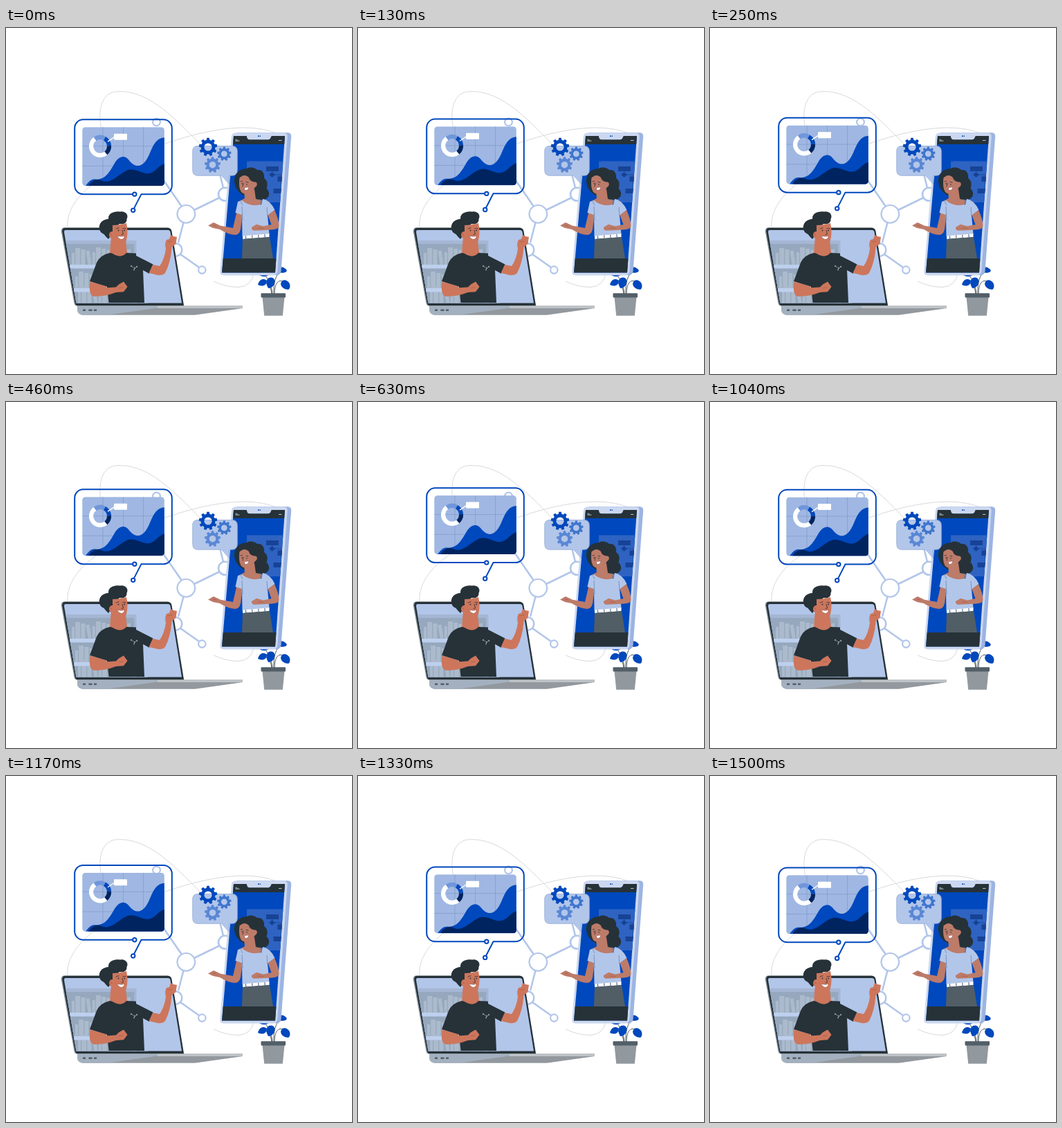
Recreate the animation shown at these times as an HTML page. Size 500 px wide and 500 px high, loop 1540 ms.

```html
<!DOCTYPE html>
<html lang="en">
<head>
<meta charset="utf-8">
<title>Online collaboration</title>
<style>
html, body { margin: 0; width: 100%; height: 100%; overflow: hidden; background: #fff; }
svg { display: block; width: 100vw; height: 100vh; }
.ink { fill: #263238; }
.blue { fill: #0048bd; }
.navy { fill: #00245f; }
.pale { fill: #b2c6ea; }
.skin { fill: #cd765c; }
.tan { fill: #bd7b69; }
.white { fill: #fff; }
.orbit { fill: none; stroke: #d2d4d7; stroke-width: .9; }
.net { fill: #fff; stroke: #b2c6ea; stroke-width: 2.6; }
.frame { fill: none; stroke: #0048bd; stroke-width: 2; }
.grid { fill: none; stroke: #849ecd; stroke-width: .8; }
.thin { fill: none; stroke: #263238; stroke-width: .8; stroke-linecap: round; }
.fold { fill: none; stroke: #a65a45; stroke-width: .7; stroke-linecap: round; }
</style>
</head>
<body>
<svg viewBox="0 0 500 500">
  <defs>
    <clipPath id="card"><rect x="110.300" y="143" width="118.500" height="85" rx="4.500"/></clipPath>
    <clipPath id="screen"><path d="M329 156H403L389 353.500H312Z"/></clipPath>
    <clipPath id="laptop"><path d="M86 292H234Q237 292 237.500 295L254 397.500H101.500L84 295Q84 292 86 292Z"/></clipPath>
  </defs>

  <g class="orbit">
    <path d="M89 288C87 264 104 241 129 223C160 199 196 179 229 167.500C276 151 344 134 389 151.500"/>
    <path d="M139 150C132 124 136 95 158 92C202 88 238 124 281 168"/>
    <path d="M300 366Q318 374.500 336 374.500Q355 373 358 355"/>
  </g>

  <g class="net">
    <path d="M205 187L254 258M272 263L309 245M309 211L314 231M256.500 281L249 310M252 327L279 346"/>
    <circle cx="260.300" cy="268.800" r="12.800" stroke-width="2.200"/>
    <circle cx="316.500" cy="240.300" r="9.500"/>
    <circle cx="245" cy="320.500" r="9.300"/>
    <circle cx="283.300" cy="349.600" r="5.200" stroke-width="2.200"/>
    <circle cx="217.500" cy="136" r="5.400" stroke-width="2.200"/>
  </g>

  <g id="panel">
    <path class="frame" d="M183 240H111.500A12.300 12.300 0 0 1 99.200 227.700V144.500A12.300 12.300 0 0 1 111.500 132.200H227.500A12.300 12.300 0 0 1 239.800 144.500V227.700A12.300 12.300 0 0 1 227.500 240H195.500L185 260.500"/>
    <g class="frame white"><circle cx="185.800" cy="240" r="2.700"/><circle cx="183.700" cy="263.200" r="2.700"/></g>
    <g clip-path="url(#card)">
      <rect x="110" y="143" width="119" height="85" fill="#9fb7e2"/>
      <path class="grid" d="M140 143V228M169.500 143V228M198.500 143V228M110 170.500H229M110 199.300H229"/>
      <path class="blue" d="M115 228C121 220 124 218 130 218.500C144 219 150 207 157 195C162 187 170 182 177 190C184 199 191 202 199 195C210 186 210 159 229 158V228Z"/>
      <path class="navy" d="M119 228C125 219 132 217 139 220.500C151 226 163 211 173 206.500C186 200 194 211 206 210C216 209 219 199 229 196V228Z"/>
    </g>
    <g id="donut" fill="none" stroke-width="6.200"></g>
    <path d="M147 164L156.500 157.500" stroke="#fff" stroke-width="1.300"/>
    <rect class="white" x="156" y="152.500" width="19" height="9" rx=".8"/>
  </g>

  <g id="plant">
    <path class="thin" d="M385 385C384 371 378 361 371 353M387 385C386 368 390 357 397 350M388 385C388 368 394 361 404 368M384 385C383 374 379 367 371 368"/>
    <g class="blue">
      <path d="M366 357C367 346 375 346 382 350C382 358 374 362 366 357Z"/>
      <path d="M391 353C393 345 399 343 405 349C408 353 401 355 391 353Z"/>
      <path d="M364 371C366 363 372 361 377 365C376 373 371 374 364 371Z"/>
      <path d="M377 372C374 363 381 358 387 362C391 368 386 376 379 376Z"/>
      <path d="M397 369C399 361 408 364 410 370C411 374 410 377 408 378C403 378 397 375 397 369Z"/>
    </g>
    <path d="M370.500 389H402.500L399.800 415.800H373.200Z" fill="#91989e"/>
    <rect x="368.500" y="383.300" width="35.500" height="6.300" rx="1" fill="#525f68"/>
  </g>

  <path d="M333 151.200H407.500Q412.500 151.500 412.200 157L397.500 351.500Q396.500 357.300 391 357.300H314Z" fill="#9cb4e2"/>
  <path d="M331 151.500H402Q407 152 406.700 157L392.300 351.500Q391.500 357.300 386 357.300H314Q308.800 357.300 309.300 352L325.800 157Q326.500 151.800 331 151.500Z" fill="#cbd8f0"/>
  <g clip-path="url(#screen)">
    <rect class="blue" x="309" y="156" width="96" height="198"/>
    <rect x="348" y="192.500" width="60" height="59.500" fill="#2e63c2"/>
    <g fill="#174395">
      <path d="M376 200H394V207H376ZM392.500 214.500H402V222H392.500ZM386.500 232H399V239H386.500ZM384.500 208L389 212L384.500 216L380 212Z"/>
      <path d="M384.500 206V212H398V236" fill="none" stroke="#174395" stroke-width=".8"/>
    </g>
    <rect class="ink" x="309" y="156" width="96" height="12"/>
    <rect class="ink" x="309" y="333" width="96" height="22"/>
  </g>
  <path d="M347.500 155.500H384L382 159.500Q381 161.300 379 161.300H351.500Q349.500 161.300 348.800 159.500Z" fill="#cbd8f0"/>
  <path d="M364 156.300H366M366.800 156.300H368" stroke="#0048bd" stroke-width="1.500"/>
  <path d="M332.500 164V160.500M334.500 164V161.500M336.500 164V162.500M394 162.500H398.500" stroke="#b7c0c8" stroke-width="1.200"/>

  <path d="M277 170.500H326.500Q334.300 170.500 334.300 178V205.500Q334.300 213.300 326.500 213.300H322.500V225.500L311.500 213.300H277Q269.700 213.300 269.700 205.500V178Q269.700 170.500 277 170.500Z" fill="#b2c6ea" stroke="#92abd9" stroke-width=".8"/>
  <g id="gears" fill-rule="evenodd"></g>

  <g id="woman">
    <path class="ink" d="M330 223C329 211 338 203 347 203.500C353 199.500 360 202 363 205C371 204 374 211 373 217C379 221 378 228 376.500 232C383 238 380 247 373 247.500C364 251 355 249 350 244C336 240 331 231 330 223Z"/>
    <path class="tan" d="M334.500 261L342 268L339 291Q337 299 331 299Q320 298 309 291L299 289L292 285.500L300 281L310 285.800L328 289Z"/>
    <path class="tan" d="M344 236L359 233L361 247L370 249L365 262L340 260L338 250L345 246Z"/>
    <path class="tan" d="M337.500 216C336 228 337.500 238 344 239.500C351 240 357 236 360 230C364 228 364 222 359 222.500C355 222 352 220 351 216C347 212 342 212 337.500 216Z"/>
    <path class="ink" d="M333 220C338 215 346 210 352 212C353 219 357 222 361 221L360 212L349 206L337 210Z"/>
    <path class="thin" d="M339 222L341.500 221.300M347 222.500L350 223M343 224L342 229"/>
    <circle class="ink" cx="341" cy="225" r=".8"/><circle class="ink" cx="348" cy="226" r=".8"/>
    <path d="M344.500 230.500L351 230C350 234 347 235.500 345 234Z" fill="#fff" stroke="#8d3f3b" stroke-width=".5"/>
    <path class="pale" d="M335 251L341 249Q352 259 369 255L371 247Q382 249 388.500 263L378 271L380.500 298L341.500 301L341 270L331.500 267Z"/>
    <path d="M338 248L342 256M367 247L369 256M341 258L342 278M377 259L378 272" fill="none" stroke="#637ba4" stroke-width=".7"/>
    <path d="M342 300.500L380.500 297.300V302.300L342 305Z" fill="#fff"/>
    <path d="M342 303L380 300" stroke="#657080" stroke-width="4.800" stroke-dasharray="1.200 8" stroke-dashoffset="-4"/>
    <path d="M342 305L381 302L386 333H341Z" fill="#515e66"/>
    <path class="tan" d="M378.500 270.500L388 263Q395 279 394.500 287Q393 291.500 381 291.700L360 292.800Q354 292.500 355 288L362 283.800L372 286.500L383.500 284Z"/>
    <path class="fold" d="M364 289L372 289.500M299 285L304 286"/>
  </g>

  <path d="M83 288.500H233.500Q238.500 289 239.300 294L257 401.500H102Q99 401 98.300 397L79.800 294Q79.800 289 83 288.500Z" fill="#88939f"/>
  <path class="ink" d="M85 288.800H234Q238.700 289 239.500 294L257 401.500H103.500Q100.500 401 99.700 397L81.200 294Q81 289.500 85 288.800Z"/>
  <g clip-path="url(#laptop)">
    <rect class="pale" x="80" y="290" width="180" height="110"/>
    <path d="M86 307H188.500V398H100Z" fill="#a5b6d4"/>
    <path d="M86 312H185V398H100Z" fill="#96a8bd"/>
    <g id="books" fill="#abbbcd"></g>
    <path d="M90 342H188.500V347.500H91ZM95 376H188.500V381.500H96Z" fill="#bdd0ee"/>
    <path class="pale" d="M184 325H205V398H184Z"/>
  </g>

  <path d="M103 401.500H342V405L273 414.800H111Q103 414 103 406Z" fill="#92989e"/>
  <path d="M103 401.500H219V404.500L146 414.800H111Q103 414 103 406Z" fill="#a3b0bf"/>
  <path d="M219 401.500H342V405H219Z" fill="#bcc2c6"/>
  <path d="M111 407.700H115M119.500 407.700H124.500M127 407.700H131" stroke="#515d69" stroke-width="2.600"/>

  <g id="man">
    <path class="skin" d="M152 301L173 307L175 326L169 333L159 331L150 326Z"/>
    <path class="ink" d="M150 325Q136 328 131 339L121 366L146 374L148.500 397H200L198 350L207 355L212.500 341.500L188 329V325.500L174 325Q166 334 153 325.500Z"/>
    <path class="ink" d="M148 305C143 301 144 299 138 296C132 290 134 277 148 276C147 267 158 264 165 265.500C172 264 178 270 174.500 276C175 283 168 284 164 283L157 290L151 301Z"/>
    <path class="skin" d="M154 285C160 285 168 284 174 282C176 290 176 299 174 307C170 316 157 313 153.500 304C147 304 148 293 154 294Z"/>
    <path class="thin" d="M159 290L163 288.700M169 289.500L173 289.800M168 292L169.500 298L167 298.500"/>
    <circle class="ink" cx="162.500" cy="292.500" r=".9"/><circle class="ink" cx="171" cy="292.500" r=".9"/>
    <path d="M160.500 300.500Q167 302 171.500 300.500Q170 306 166 305.500Q162 304 160.500 300.500Z" fill="#fff" stroke="#8b3e32" stroke-width=".5"/>
    <path class="skin" d="M121.500 366.500L146 373.500L144 375.500L159 374.500L163 370.500L170 366.500L175.500 374L170 381.300L159 382Q142 388.500 126 387.800Q119 385 121.500 366.500Z"/>
    <path class="skin" d="M212 342L222 344Q229 334 231 319Q229 311 232 306L236 305L238 299L242 301L247 302L245.500 312L239.500 317Q238 339 230 354Q226 358 219 357L206.500 354Z"/>
    <path class="fold" d="M163 376L169 375M234 309L240 308M151 297L153 300"/>
    <g fill="#88929a"><path d="M181 344L186 347L189 345M186 347L185 350" fill="none" stroke="#88929a" stroke-width=".8"/><circle cx="181" cy="344" r="1.200"/><circle cx="186" cy="347" r="1.200"/><circle cx="189" cy="345" r="1.200"/><circle cx="185" cy="349.500" r="1"/></g>
  </g>
</svg>
<script>
const $ = id => document.getElementById(id);
const polar = (x, y, r, a) => `${(x + r * Math.cos(a)).toFixed(2)} ${(y + r * Math.sin(a)).toFixed(2)}`;

function add(parent, tag, attrs) {
  const el = document.createElementNS("http://www.w3.org/2000/svg", tag);
  for (const key in attrs) el.setAttribute(key, attrs[key]);
  parent.appendChild(el);
}

function arc(from, to, stroke) {
  const rad = deg => (deg - 90) * Math.PI / 180;
  const big = to - from > 180 ? 1 : 0;
  add($("donut"), "path", {
    stroke,
    d: `M${polar(136, 170.8, 13, rad(from))}A13 13 0 ${big} 1 ${polar(136, 170.8, 13, rad(to))}`
  });
}

function gear(x, y, r, hole, fill) {
  const teeth = 9, step = 2 * Math.PI / teeth, pts = [];
  for (let i = 0; i < teeth; i++) {
    const a = i * step - Math.PI / 2;
    for (const [shift, k] of [[-.31, .78], [-.2, 1], [.2, 1], [.31, .78]])
      pts.push(polar(x, y, r * k, a + shift * step));
  }
  const ring = `M${x - hole} ${y}a${hole} ${hole} 0 1 0 ${2 * hole} 0a${hole} ${hole} 0 1 0 ${-2 * hole} 0Z`;
  add($("gears"), "path", { fill, d: `M${pts.join("L")}Z${ring}` });
}

function shelf(x, end, floor) {
  for (let i = 0; x < end; i++) {
    const w = 4 + i * 3 % 4, h = 17 + i * 7 % 9;
    const lean = i % 4 === 3 ? -9 : 0;
    add($("books"), "rect", { x, y: floor - h, width: w, height: h, transform: `rotate(${lean} ${x} ${floor})` });
    x += w + 1.2 + (i % 4 === 2 ? 3 : 0);
  }
}

arc(140, 325, "#fff");
arc(325, 390, "#7096db");
arc(30, 87, "#0048bd");
arc(87, 140, "#00245f");
gear(292, 172, 13.3, 5.6, "#0048bd");
gear(315.3, 181.8, 10.3, 4.4, "#3f75cd");
gear(298.5, 197.7, 11.6, 4.8, "#5a87d5");
shelf(95, 180, 342);
shelf(100, 180, 376);
shelf(104, 180, 397.5);

const LOOP = 1540, FRAME = 1000 / 24;

function draw(ms) {
  const t = Math.floor((ms % LOOP + 4.9) / FRAME) * FRAME;
  const y = 4.25 * Math.cos(2 * Math.PI * (t + 35) / LOOP) - 4.05;
  $("panel").setAttribute("transform", `translate(0 ${y.toFixed(3)})`);
}

const start = performance.now();
function tick() {
  draw(performance.now() - start);
  requestAnimationFrame(tick);
}
tick();
</script>
</body>
</html>
```
